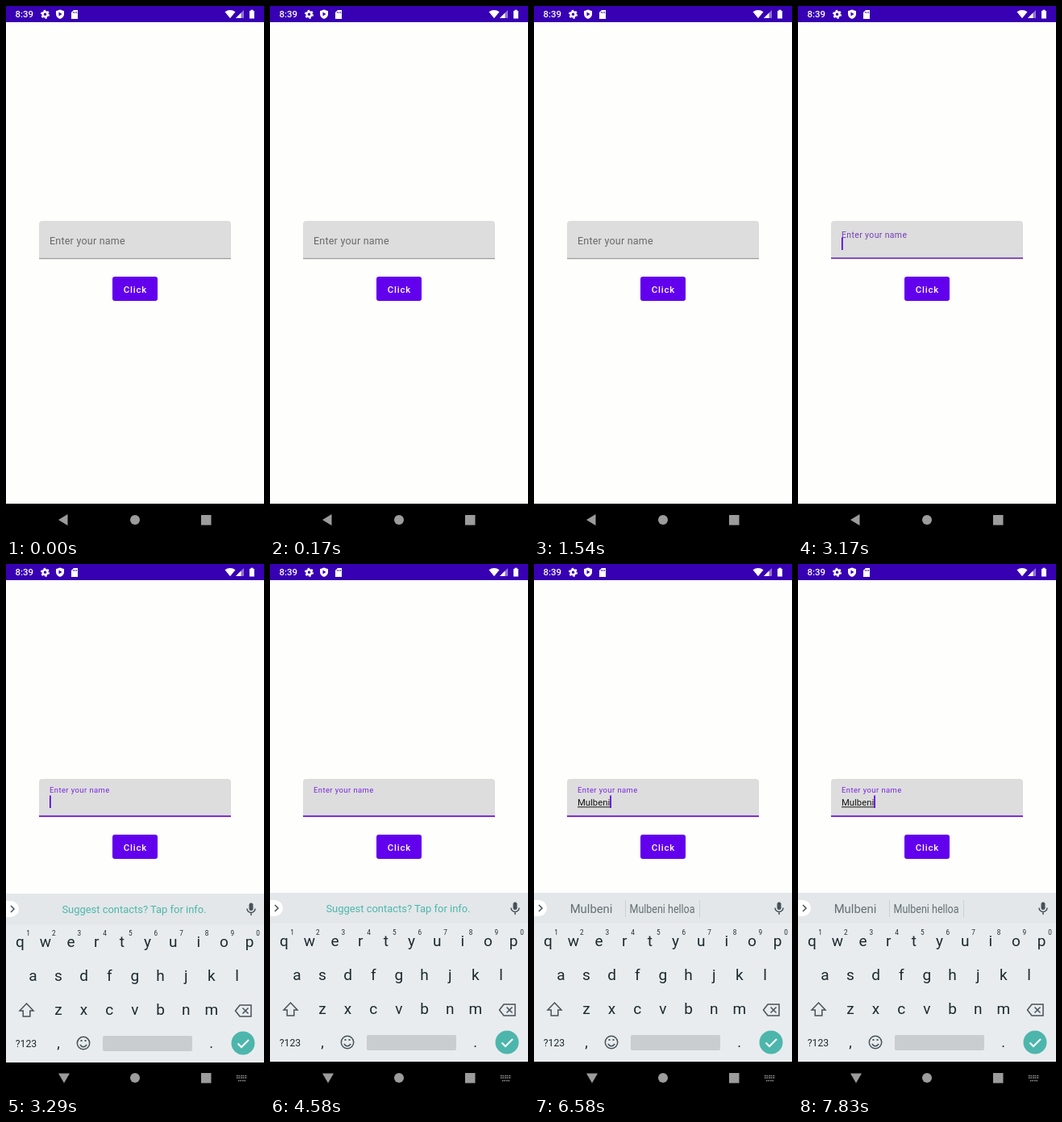
Write an HTML page that moves like this. It is 320x656 px and loops after 8 s.

```html
<!DOCTYPE html>
<html lang="en">
<head>
<meta charset="utf-8">
<title>Name form</title>
<style>
html, body { margin: 0; width: 100%; height: 100%; overflow: hidden; background: #fefefc; }
svg { display: block; width: 100vw; height: 100vh; font-family: Roboto, Arial, sans-serif; }
.mid { text-anchor: middle; }
.line { fill: none; stroke: #46525a; stroke-width: 1.5; }
</style>
</head>
<body>
<svg viewBox="0 0 320 656">
  <rect width="320" height="656" fill="#fefefc"/>

  <!-- status bar -->
  <rect width="320" height="20" fill="#3700b3"/>
  <g fill="#fff">
    <text x="11.5" y="14" font-size="11.4" font-weight="500">8:39</text>
    <circle cx="48.5" cy="10.3" r="3" fill="none" stroke="#fff" stroke-width="2.4"/>
    <circle cx="48.5" cy="10.3" r="4.7" fill="none" stroke="#fff" stroke-width="1.6" stroke-dasharray="2.4 2.52"/>
    <path d="M67 4.5l5 1.8v3.8q0 4-5 6q-5-2-5-6V6.3z"/>
    <path d="M65.5 7.6v5l4-2.5z" fill="#3700b3"/>
    <path d="M84 5h5v11h-8V8z"/>
    <path d="M83.5 7v2m2-2v2m2-2v2" stroke="#3700b3" stroke-width=".8"/>
    <path d="M271.5 7.3q6.5-4.6 13 0l-6.5 8z"/>
    <path d="M295 5v10h-10z" opacity=".45"/>
    <path d="M291.5 8.5V15H285z"/>
    <path d="M302 6h1.5V4.8h3V6h1.5v9.5h-6z"/>
  </g>

  <!-- form -->
  <path d="M41 313V270q0-4 4-4h230q4 0 4 4v43z" fill="#dddddd"/>
  <rect id="rule" x="41" width="238"/>
  <text id="label" x="54">Enter your name</text>
  <text id="typed" x="54" y="299" font-size="11.3" fill="#161616"></text>
  <rect id="under" x="54" y="300.3" height="1" fill="#161616"/>
  <rect id="caret" y="286.5" width="1.7" height="15.5" fill="#5a00d8"/>
  <rect x="132" y="335" width="56" height="30" rx="3" fill="#6200ee"/>
  <text class="mid" x="160.4" y="354.7" font-size="11.4" font-weight="500" letter-spacing=".8" fill="#fff">Click</text>

  <rect y="616" width="320" height="40"/>

  <!-- keyboard -->
  <g id="board">
    <rect y="407" width="320" height="209" fill="#e9ecee"/>
    <rect y="407" width="320" height="38" fill="#e3e7e9"/>
    <rect y="616" width="320" height="40"/>
    <path d="M0 416h6a10 10 0 0 1 0 20H0z" fill="#fff"/>
    <path class="line" d="M6 422l4 4-4 4"/>
    <rect x="301.5" y="418.5" width="5" height="9.5" rx="2.5" fill="#46525a"/>
    <path class="line" d="M299 425.5a5 5 0 0 0 10 0M304 430.5v3.5"/>
    <text id="tip" class="mid" x="159" y="431" font-size="12.95" fill="#4db6ac">Suggest contacts? Tap for info.</text>
    <g id="hints" class="mid" font-size="14.8">
      <path d="M113.5 416v21M205.5 416v21" stroke="#cbd0d2"/>
      <text></text><text></text><text></text>
    </g>
    <g id="keys" class="mid" fill="#1b2a31"></g>
    <path class="line" d="M25.5 543l8.5 9h-4.2v7h-8.6v-7H17z"/>
    <path class="line" d="M290 545h14v14h-14l-5.5-7zM293.5 548.5l7 7m0-7l-7 7"/>
    <circle class="line" cx="96" cy="592" r="7.7"/>
    <path class="line" d="M91.8 594q4.2 5.5 8.4 0"/>
    <path d="M92.5 589h2m3 0h2" stroke="#46525a" stroke-width="2"/>
    <rect x="120" y="583" width="111" height="19" rx="2" fill="#c9cdd0"/>
    <circle cx="294" cy="592" r="14.5" fill="#4db6ac"/>
    <path d="M287.5 592.5l4.5 4.5 9-9" fill="none" stroke="#fff" stroke-width="2"/>
  </g>

  <!-- navigation bar -->
  <g fill="#9c9c9c">
    <path id="back"/>
    <circle cx="160" cy="636" r="6"/>
    <rect x="242" y="630" width="12.5" height="12.5"/>
    <path id="switch" d="M286 633.5h13m-13 2.5h13m-11 3.5h9" fill="none" stroke="#9c9c9c" stroke-width="1.5" stroke-dasharray="1.5 1"/>
  </g>
</svg>
<script>
const LOOP = 8000;
const NAME = "Mulbeni";
const KEY_TIMES = [4710, 5000, 5380, 5670, 5880, 6080, 6290];
const FOCUS = 3070, BOARD = 3180;
const GUESSES = [["My", "Me"], ["Must", "Much"]];
const CENTERS = [71, 159, 246];

const $ = id => document.getElementById(id);
const clamp = v => Math.max(0, Math.min(1, v));
const mix = (a, b, p) => a + (b - a) * p;
const blend = (a, b, p) => `rgb(${a.map((v, i) => Math.round(mix(v, b[i], p)))})`;
const show = (el, on) => el.setAttribute("visibility", on ? "inherit" : "hidden");

function set(el, attrs) {
  for (const name in attrs) el.setAttribute(name, attrs[name]);
}

function addKey(text, x, y, size) {
  const el = document.createElementNS("http://www.w3.org/2000/svg", "text");
  set(el, { x, y, "font-size": size });
  el.textContent = text;
  $("keys").append(el);
}

function addRow(letters, x, y, size) {
  [...letters].forEach((c, i) => addKey(c, x + i * 31.65, y, size));
}

addRow("qwertyuiop", 17.3, 472.5, 19);
addRow("1234567890", 27.6, 459, 8.2);
addRow("asdfghjkl", 33.3, 514.5, 19);
addRow("zxcvbnm", 64.9, 557, 19);
addKey("?123", 25, 597, 12.2);
addKey(",", 65, 598, 18);
addKey(".", 254.5, 598, 18);

function guesses(count) {
  const typed = NAME.slice(0, count);
  if (count === NAME.length) return [typed, typed + " helloa", ""];
  return [typed, ...(GUESSES[count - 1] || [NAME, "Mulbine"])];
}

function drawHints(count) {
  show($("tip"), !count);
  show($("hints"), count);
  if (!count) return;
  const words = guesses(count), done = count === NAME.length;
  $("hints").querySelectorAll("text").forEach((el, i) => {
    el.textContent = words[i];
    const strong = i === 1 && !done;
    set(el, { "font-weight": strong ? 700 : 400, fill: strong ? "#0a0d0f" : "#657076" });
    // long guesses are condensed to the slot
    const fit = Math.min(1, 81 / (el.getComputedTextLength() || 1));
    el.setAttribute("transform", `translate(${CENTERS[i]} 432) scale(${fit} 1)`);
  });
}

function caretOn(t, count) {
  if (t < FOCUS) return false;
  if (count === NAME.length) return t < 6830 || t >= 7830;
  const since = count ? KEY_TIMES[count - 1] : FOCUS + 10;
  return (t - since) % 1000 < 500;
}

let lastCount = -1;

function draw(t) {
  const count = KEY_TIMES.filter(k => t >= k).length;
  const lin = clamp((t - FOCUS) / 167), p = lin * lin * (3 - 2 * lin);

  set($("label"), {
    y: mix(295.3, 283.2, p),
    "font-size": mix(12.45, 9.4, p),
    "letter-spacing": mix(0.25, 0.45, p),
    fill: blend([104, 104, 104], [122, 38, 224], p)
  });
  set($("rule"), {
    y: p ? 311.3 : 312.3,
    height: p ? 1.8 : 0.9,
    fill: blend([130, 130, 130], [112, 20, 205], p)
  });

  if (count !== lastCount) {
    $("typed").textContent = NAME.slice(0, count);
    drawHints(count);
    lastCount = count;
  }
  const width = count ? $("typed").getComputedTextLength() : 0;
  $("under").setAttribute("width", width);
  $("caret").setAttribute("x", 54 + width);
  show($("caret"), caretOn(t, count));

  const up = t >= BOARD, rise = 60 * (1 - clamp((t - BOARD) / 200)) ** 5;
  show($("board"), up);
  set($("board"), { transform: `translate(0 ${rise})`, opacity: clamp((t - BOARD) / 100) });
  $("back").setAttribute("d", up ? "M65 630.5h14l-7 12z" : "M65 636l11.5-7v14z");
  show($("switch"), up);
}

const start = performance.now();
function tick() {
  draw((performance.now() - start) % LOOP);
  requestAnimationFrame(tick);
}
tick();
</script>
</body>
</html>
```
